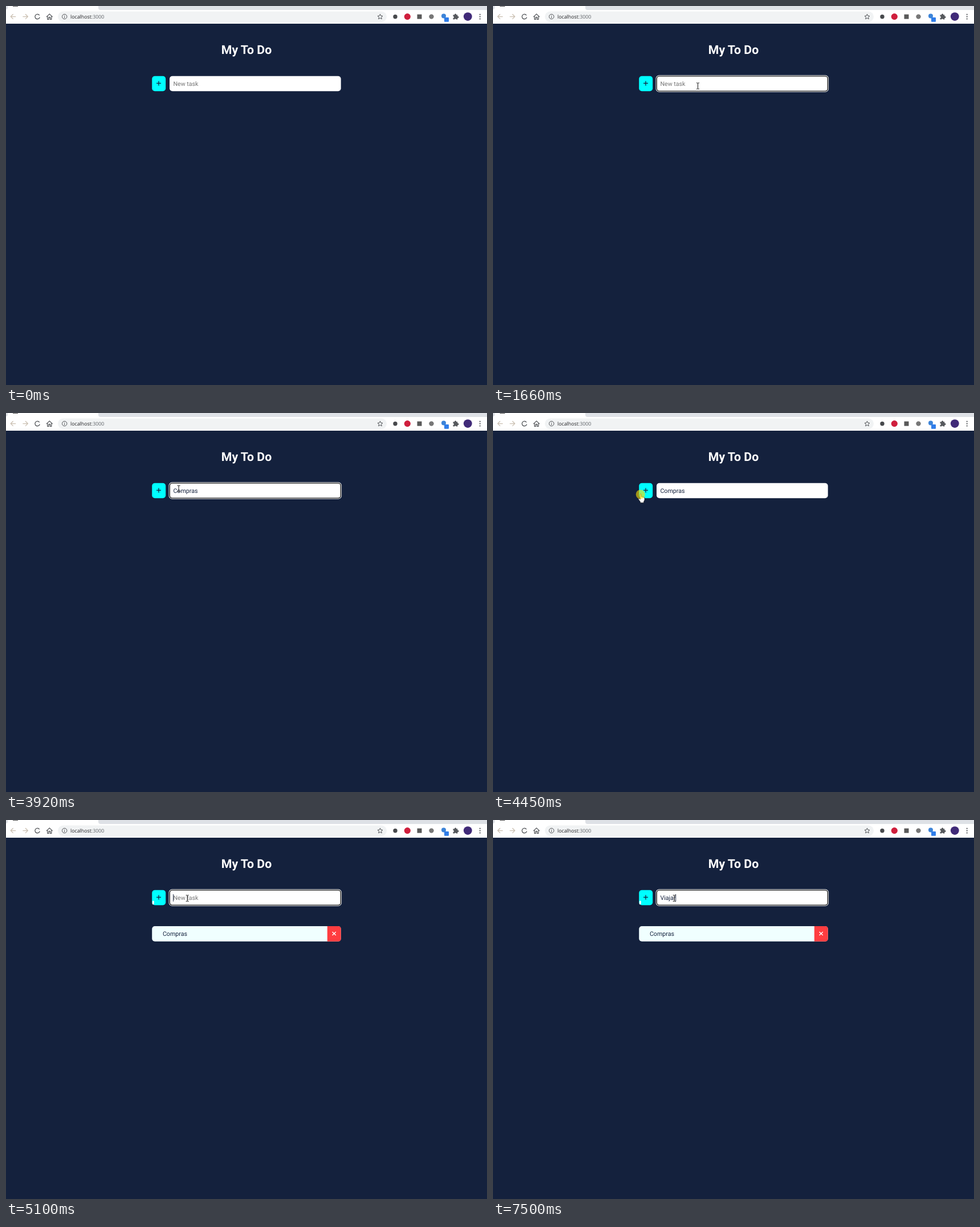
Recreate the animation shown at these times as an HTML page. Size 844 px wide and 664 px high, loop 7990 ms.

```html
<!DOCTYPE html>
<html lang="en">
<head>
<meta charset="utf-8">
<title>My To Do</title>
<style>
  html, body { margin: 0; width: 100%; height: 100%; overflow: hidden; background: #14213d; }
  svg { display: block; text-rendering: geometricPrecision; }
  text { font: 10.67px Roboto, sans-serif; fill: #14213d; white-space: pre; }
  .title { font-size: 21.33px; font-weight: 700; fill: #fff; text-anchor: middle; }
  .url { font: 8.8px "Open Sans", "Noto Sans", sans-serif; fill: #202124; }
  .line { fill: none; stroke: #505357; stroke-width: 1.3; }
</style>
</head>
<body>
<svg width="844" height="664" viewBox="0 0 844 664">
  <!-- browser bar -->
  <rect width="844" height="31" fill="#fff"/>
  <path d="M162 0V3Q162 7 166 7H844V0ZM0 0H3V3Q3 6 0 6Z" fill="#dee1e6"/>
  <rect x="12" width="9" height="1" fill="#555"/>
  <rect x="91" y="9.5" width="577" height="18.5" rx="9.25" fill="#f1f3f4"/>
  <g class="line">
    <path d="M17.2 18.6H8.5M12.6 14.3 8.3 18.6 12.6 22.9M29.4 18.6H38.1M34 14.3 38.3 18.6 34 22.9" stroke="#cabfb1"/>
    <path d="M58.6 16.3A4.2 4.2 0 1 0 59.2 19.6"/>
    <path d="M70.9 19.1 76.3 14 81.7 19.1M72.8 18V23.3H75.1V19.7H77.5V23.3H79.8V18" stroke-width="1.2"/>
    <circle cx="102.7" cy="18.6" r="4.2" stroke-width="1"/>
    <path d="M102.7 18V21M102.7 16V17" stroke-width="1"/>
    <path d="M656.5 14.2 657.8 17.2 661 17.5 658.6 19.7 659.3 22.8 656.5 21.2 653.7 22.8 654.4 19.7 652 17.5 655.2 17.2Z" stroke-width="1"/>
  </g>
  <text class="url" x="113" y="21.9">localhost<tspan fill="#5f6368">:3000</tspan></text>
  <circle cx="683" cy="18.7" r="3.7" fill="#47494c"/>
  <circle cx="704.3" cy="18.6" r="5.6" fill="#cf1f3d"/>
  <rect x="721.5" y="14.7" width="8" height="8" fill="#5a5a5a"/>
  <circle cx="746.5" cy="18.6" r="4.2" fill="#777"/>
  <circle cx="768" cy="17.6" r="4" fill="#3d84d8"/>
  <rect x="769" y="20" width="8" height="7.7" rx="1" fill="#2f7de9"/>
  <path d="M784.5 15.6H787.1A1.6 1.6 0 1 1 790.1 15.6H792.4V18A1.6 1.6 0 1 1 792.4 21V23.5H789.9A1.5 1.5 0 0 0 787 23.5H784.5V21A1.5 1.5 0 0 0 784.5 18Z" fill="#55585c"/>
  <circle cx="810.3" cy="18.6" r="7.4" fill="#402a78"/>
  <path d="M831.7 14.8v0M831.7 18.7v0M831.7 22.6v0" stroke="#505357" stroke-width="2.2" stroke-linecap="round"/>

  <!-- page -->
  <rect y="31" width="844" height="633" fill="#14213d"/>
  <text class="title" x="422" y="84.2">My To Do</text>
  <rect x="256.2" y="122.7" width="24" height="26.6" rx="5" fill="#0ff"/>
  <path d="M264 135.4H272M268 131.4V139.4" stroke="#14213d" stroke-width="1.3"/>
  <rect id="residue" x="256.8" y="141.5" width="3" height="6.5" rx="1.3" fill="#fff"/>
  <rect x="287" y="122.7" width="300.7" height="26.6" rx="5" fill="#fff"/>
  <g id="ring">
    <rect x="285.6" y="121.3" width="303.4" height="29.4" rx="6" fill="#fff"/>
    <rect x="286.5" y="122.2" width="301.6" height="27.6" rx="5.2" fill="#101010"/>
    <rect x="287.9" y="123.6" width="298.8" height="24.8" rx="4" fill="#fff"/>
  </g>
  <text id="field" x="293.4" y="139.8"></text>
  <rect id="caret" y="130" width="0.9" height="12.8" fill="#14213d"/>
  <g id="item">
    <rect x="256.2" y="186.1" width="331.5" height="26.6" rx="5" fill="#f0ffff"/>
    <path d="M563.8 186.1H582.7Q587.7 186.1 587.7 191.1V207.7Q587.7 212.7 582.7 212.7H563.8Z" fill="#ff3d40"/>
    <text x="274.9" y="203.3">Compras</text>
    <path d="M572.6 195.9 578.8 202.1M578.8 195.9 572.6 202.1" stroke="#fff" stroke-width="1.4"/>
  </g>

  <!-- pointer -->
  <g id="pointer">
    <path id="arrow" d="M0 0V10.4L2.4 8.2 4.1 12 5.8 11.2 4.2 7.6H7.4Z" fill="#fff" stroke="#0a1020" stroke-width=".5"/>
    <path id="beam" d="M-2.3-5.2H-.6L.2-4.7 1-5.2H2.7M.2-4.7V4.9M-2.3 5.4H-.6L.2 4.9 1 5.4H2.7" fill="none" stroke="#111"/>
    <path id="hand" d="M-1.1 .4Q0-1 1.2 .4V4.6Q2.4 4 3.2 5 4.4 4.5 5 5.6 6.6 5.3 6.8 7V10.4L5.4 13.2V15.2H-.8V13.6L-4 9.2Q-4.3 7.5-2.6 7.8L-1.1 9.2Z" fill="#fff" stroke="#111" stroke-width=".7"/>
    <circle id="click" r="8" cx="-.5" cy=".5" fill="#ffe100" opacity=".6"/>
  </g>
</svg>
<script>
const LOOP = 7990, BLINK = 540, FIELD_X = 293.4;
const el = Object.fromEntries([...document.querySelectorAll('[id]')].map(e => [e.id, e]));
const show = (name, on) => el[name].style.display = on ? '' : 'none';
const within = (t, spans) => spans.some(([a, b]) => t >= a && t < b);

const sessions = [
  { focus: 1120, blur: 4400, clear: 4500, word: 'Compras', keys: [1980, 2280, 2370, 2630, 2770, 2960, 3050] },
  { focus: 5100, blur: LOOP, clear: LOOP, word: 'Viajar', keys: [5920, 6170, 6320, 7110, 7220, 7500] }
];
const clicks = [[1120, 1200], [4400, 4500], [5130, 5210]];

const easeOut = u => 1 - (1 - u) ** 1.75;
const easeInOut = u => u * u * (3 - 2 * u);
const moves = [
  { start: 280, end: 850, from: [832, 648], to: [359.3, 140], ease: easeOut, lift: 0 },
  { start: 3590, end: 4200, from: [359.3, 140], to: [259.2, 142], ease: easeInOut, lift: 9 },
  { start: 4540, end: 4950, from: [259.2, 142], to: [318, 137], ease: easeInOut, lift: 0 }
];

function drawField(t) {
  const s = sessions.find(s => t < s.clear);
  const count = s.keys.filter(k => t >= k).length;
  el.field.textContent = count ? s.word.slice(0, count) : 'New task';
  el.field.style.fill = count ? '#14213d' : '#757575';

  const focused = t >= s.focus && t < s.blur;
  const last = count ? s.keys[count - 1] : s.focus;
  show('ring', focused);
  show('caret', focused && Math.floor((t - last) / BLINK) % 2 === 0);
  el.caret.setAttribute('x', FIELD_X - 0.3 + (count ? el.field.getComputedTextLength() : 0));
}

function drawPointer(t) {
  const m = moves.filter(m => t >= m.start).pop();
  show('pointer', m);
  if (!m) return;
  const e = m.ease(Math.min(1, (t - m.start) / (m.end - m.start)));
  const [x, y] = m.from.map((a, i) => a + (m.to[i] - a) * e);
  const py = y - m.lift * Math.sin(Math.PI * e);
  const inRow = py > 122.7 && py < 149.3;
  const overField = inRow && x > 287 && x < 587.7;
  const overButton = inRow && x > 256.2 && x < 280.2;
  show('beam', overField);
  show('hand', overButton);
  show('arrow', !overField && !overButton);
  show('click', within(t, clicks));
  el.pointer.setAttribute('transform', `translate(${x} ${py})`);
}

function frame(now) {
  const t = now % LOOP;
  drawField(t);
  drawPointer(t);
  show('item', t >= 4500);
  show('residue', t >= 4600);
  requestAnimationFrame(frame);
}
frame(0);
</script>
</body>
</html>
```
